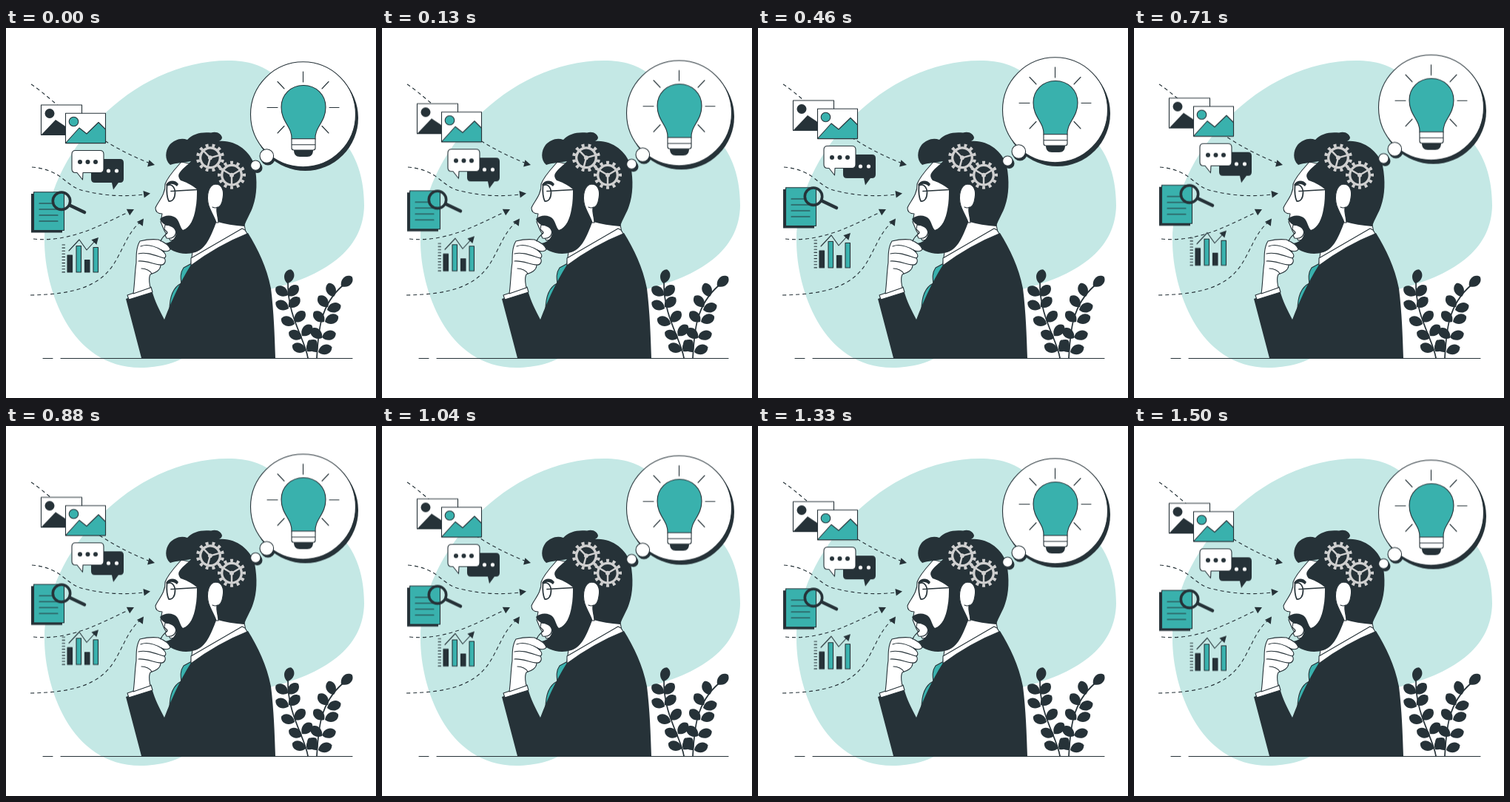
An HTML page for the animation above (1.54 s loop, 500x500 px).

```html
<!DOCTYPE html>
<html lang="en">
<head>
<meta charset="utf-8">
<title>Thinking man</title>
<style>
  html, body { margin: 0; width: 100%; height: 100%; overflow: hidden; background: #fff; }
  svg { display: block; width: 100%; height: 100%; }
  .ink { fill: #263238; }
  .teal { fill: #39b1ad; }
  .white { fill: #fff; }
  .line { fill: none; }
  .line, .edge { stroke: #263238; stroke-width: 1.1; stroke-linecap: round; stroke-linejoin: round; }
  .dash { stroke-dasharray: 5 4; stroke-linecap: butt; }
  .float { animation: float 1540ms linear infinite; }
  @keyframes float {
    0%, 100% { transform: translateY(0); }
    47.4% { transform: translateY(-9.6px); }
    97.4% { transform: translateY(.4px); }
  }
</style>
</head>
<body>
<svg viewBox="0 0 500 500">
  <defs>
    <path id="leaf" class="ink" d="M0 0C-9 -5 -8.500 -17 0 -19.500C8.500 -17 9 -5 0 0Z"/>
    <path id="tip" class="ink" d="M0 0L-9 -4.800V4.800Z"/>
    <g id="gear" fill="none" stroke="#d0d0d0">
      <circle r="13.300" stroke-width="3.300"/>
      <circle r="16.800" stroke-width="4.400" pathLength="24" stroke-dasharray=".9 1.1" stroke-dashoffset=".45"/>
      <path d="M0 0V13M0 0L-11 -6.500M0 0L11 -6.500" stroke-width="2.400"/>
      <circle r="2" stroke-width="2"/>
    </g>
  </defs>

  <path fill="#c4e8e5" d="M300 44C328 44 347 51 362 63C395 88 425 122 450 146C475 171 484 205 484 240C483 295 440 332 357 353C300 368 290 405 255 436C235 453 205 459 182 459C85 459 52 350 52 288C52 170 170 44 300 44Z"/>

  <g class="line dash">
    <path d="M34 76C70 100 110 150 195 183"/>
    <path d="M35 188C80 192 78 216 110 221C135 227 160 228 187 225"/>
    <path d="M37 285C85 290 125 268 167 248"/>
    <path d="M33 361C90 360 125 350 145 320C158 300 165 275 182 262"/>
  </g>
  <use href="#tip" transform="translate(201 185) rotate(14)"/>
  <use href="#tip" transform="translate(195 223.500) rotate(-8)"/>
  <use href="#tip" transform="translate(173 245) rotate(-27)"/>
  <use href="#tip" transform="translate(186 257.500) rotate(-55)"/>

  <g id="plants">
    <path class="line" d="M408 446C404 420 380 390 381 343M420 446C422 410 424 375 455 348" style="stroke-width:1.7"/>
  </g>

  <!-- head -->
  <path class="white edge" d="M237 181C229 190 219 200 215 211C216 225 205 235 202 243C202 249 206 251 211 251L209 262L214 274L222 287L264 282L262 186Z"/>
  <path class="white edge" d="M286 238L322 266L324 276L250 318L252 302Z"/>
  <path class="ink" d="M250 180C240 182 230 182 222 185C214 178 215 166 221 158C228 151 236 148 245 151C252 143 264 140 277 141.500C285 139 291 143 292 148C292 150 290 152 288 153C310 151 330 166 336 186C340 206 339 226 334 240C331 250 325 258 322 268C308 267 296 265 286 262L284 263C277 281 270 299 256 303C240 308 222 303 213 291C219 291 226 288 229 281C231 275 228 270 222 268C216 267 211 265 208 258C214 252 226 252 231 258C235 263 235 269 239 273C249 270 254 257 256 245C258 235 258 226 258 218C250 211 242 208 236 206C233 202 232 199 235 195C239 189 245 186 250 180Z"/>
  <path class="white edge" d="M284 263C282 256 277 249 274 240C270 226 274 212 283 211C292 211 295 220 293 230C292 238 289 242 285 243C284 250 287 256 287 263Z"/>
  <path class="line" d="M279 242Q283 244 286 242"/>
  <path class="ink" d="M216 212C220 205 229 205 233 211L231 214C226 210 222 210 217 213Z"/>
  <path class="line" d="M217.500 213C223 210 228 214 228.500 222C228.500 230 225 235 220 234C217 228 217 220 217.500 213ZM223 220.500L258 218.500" style="stroke-width:1.7"/>
  <path class="white edge" d="M215 266C222 266 230 270 229.500 277C228 283 223 285 217 284L215 280L218 276L214 272Z"/>

  <!-- body -->
  <path class="teal edge" d="M251 318L240 324C235 331 236 338 237 345C226 350 221 362 221 382L234 365L258 328Z"/>
  <path class="ink" d="M183 446L162 366L197 354C201 370 208 382 214 394C222 373 234 345 250 320Q286 294 327 277C341 300 352 322 358 352C362 384 363 416 364 446Z"/>
  <path class="white edge" d="M250 311L319 271L323 273L326 278Q286 294 250 321Z"/>
  <path class="white edge" d="M164 361L196 350L198 357L166 367Z"/>
  <path class="white edge" d="M172 359C174 345 174 330 176 317C176 307 176 296 181 288C189 286 198 285 206 286C213 289 220 293 222 299C220 303 213 302 210 300C215 304 218 308 214 311C217 315 214 321 209 320C209 328 201 331 195 333C192 339 194 345 195 351Z"/>
  <path class="line" d="M182 295C192 291 203 296 210 300M179 305C190 302 203 308 214 311M179 315C190 314 201 320 209 320M183 325C189 325 195 328 197 332M209 288C211 282 215 280 218 277"/>

  <use href="#gear" transform="translate(276 175.300) rotate(15)"/>
  <use href="#gear" transform="translate(305 198.700)"/>

  <path class="line" d="M50 446.500H63M74 446.500H468"/>

  <g class="float">
    <!-- idea -->
    <g class="ink">
      <circle cx="404.500" cy="121.500" r="71.500"/>
      <circle cx="354" cy="176" r="9.500"/>
      <circle cx="339.500" cy="189" r="7"/>
    </g>
    <g class="white edge">
      <circle cx="401.500" cy="116.800" r="71"/>
      <circle cx="352.300" cy="173" r="9.300"/>
      <circle cx="337.300" cy="185.700" r="6.700"/>
    </g>
    <path class="line" d="M401.500 59V73M353 107.500H367M437 107.500H450M367 72.500L376 82M436 72.500L427 82M367 142L376 132.500M436 142L427 132.500"/>
    <path class="teal edge" d="M386 150C387 134 372 127 372 107C372 90 385 77.500 402 77.500C419 77.500 432 90 432 107C432 127 417 134 418 150Z"/>
    <path class="white edge" d="M386 149.800H418V162Q418 165 415 165H389Q386 165 386 162ZM386 157.800H418"/>
    <path class="ink" d="M389 165H415C415 171 412 174 407 174H397C392 174 389 171 389 165Z"/>

    <!-- pictures -->
    <rect class="white edge" x="47.500" y="104" width="55" height="40.500"/>
    <circle class="ink" cx="59" cy="115.500" r="6.500"/>
    <path class="ink" d="M48 144L67 124L79 132L92 144Z"/>
    <rect class="white edge" x="80.500" y="115.300" width="54" height="40.300"/>
    <circle class="teal edge" cx="91.500" cy="126.500" r="6.300"/>
    <path class="teal edge" d="M80.500 155.500L99 135L109 143L125 127.500L134.500 137V155.500Z"/>

    <!-- chat -->
    <path class="ink" d="M120 177H154Q159 177 159 182V204Q159 209 154 209H152L145 218.500L143 209H120Q115 209 115 204V182Q115 177 120 177Z"/>
    <path class="white edge" d="M94 165.500H127Q132 165.500 132 170.500V190.500Q132 195.500 127 195.500H104L103.500 205L96 195.500H94Q89 195.500 89 190.500V170.500Q89 165.500 94 165.500Z"/>
    <g class="ink"><circle cx="100" cy="181" r="3"/><circle cx="110.500" cy="181" r="3"/><circle cx="121" cy="181" r="3"/></g>
    <g class="white"><circle cx="138.500" cy="193" r="2.600"/><circle cx="149.500" cy="193" r="2.600"/></g>

    <!-- document -->
    <path class="ink" d="M34 224H76V276.500H34Z"/>
    <path class="teal edge" d="M37.500 221.800H78.500V273.500H37.500Z"/>
    <path class="line" d="M45 237H62M45 245H70M45 253H70M45 261H70"/>
    <circle class="line" cx="75" cy="233.700" r="11.700" style="stroke-width:3.6"/>
    <path class="line" d="M86 239.500L106 249" style="stroke-width:4.6"/>

    <!-- chart -->
    <path class="line" id="ticks"/>
    <path class="ink edge" d="M83 307H89.500V330H83ZM106.500 313.500H113V330H106.500Z"/>
    <path class="teal edge" d="M95 294.500H101.500V330H95ZM118 296.500H124.500V330H118Z"/>
    <path class="line" d="M85 301L99 286L109 300L121 287"/>
    <use href="#tip" transform="translate(125 283) rotate(-47)"/>
  </g>
</svg>
<script>
  const NS = "http://www.w3.org/2000/svg";
  const plants = document.getElementById("plants");
  const leaves = [ // x, y, angle
    [380, 345, 15], [381, 361, -58], [381, 362, 45], [382, 379, -64], [382, 377, 50],
    [390, 400, -68], [390, 397, 45], [400, 419, -66], [400, 416, 42], [405, 436, -68], [407, 437, 38],
    [453, 349, 49], [443, 363, -22], [434, 381, 72], [435, 377, -40], [431, 397, 68],
    [430, 397, -46], [427, 418, 74], [427, 419, -50], [422, 438, 70], [420, 438, -34]
  ];
  for (const [x, y, a] of leaves) {
    const leaf = document.createElementNS(NS, "use");
    leaf.setAttribute("href", "#leaf");
    leaf.setAttribute("transform", `translate(${x} ${y}) rotate(${a})`);
    plants.append(leaf);
  }
  let d = "";
  for (let i = 0; i < 10; i++) d += `M76 ${293 + i * 4.1}H79.5`;
  document.getElementById("ticks").setAttribute("d", d);
</script>
</body>
</html>
```
